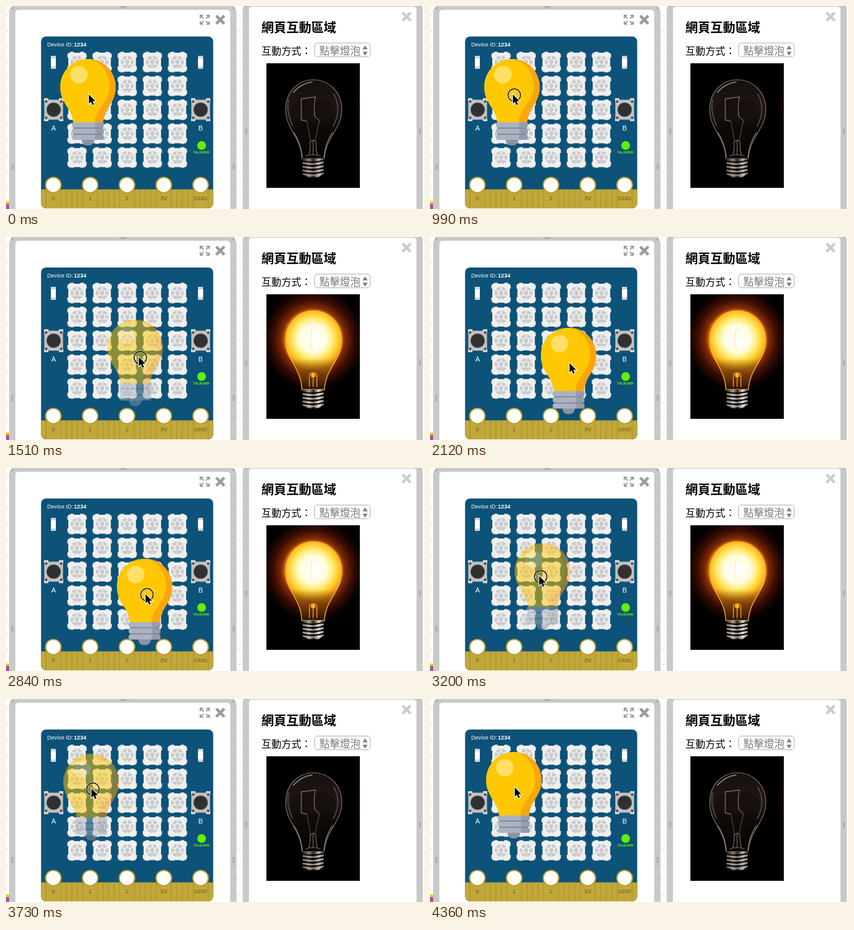
Write an HTML page with a canvas that moves like this. It is 671 px wide and 326 px high and loops after 5170 ms.

```html
<!DOCTYPE html>
<html lang="zh-Hant">
<head>
<meta charset="utf-8">
<title>Drag the bulb</title>
<style>
html, body { margin: 0; width: 100%; height: 100%; overflow: hidden; background: #fff; }
canvas { display: block; }
</style>
</head>
<body>
<canvas id="stage" width="671" height="326"></canvas>
<script>
const W = 671, H = 326, LOOP = 5170;
const SANS = '"Liberation Sans", Arial, sans-serif';
const CJK = '"Noto Sans CJK TC", "Noto Sans CJK", sans-serif';
const stage = document.getElementById('stage').getContext('2d');

function layer(w, h, draw) {
  const c = document.createElement('canvas');
  c.width = w;
  c.height = h;
  draw(c.getContext('2d'));
  return c;
}

function rect(g, x, y, w, h, color, r = 0) {
  g.fillStyle = color;
  g.beginPath();
  g.roundRect(x, y, w, h, r);
  g.fill();
}

function oval(g, x, y, rx, ry, color) {
  g.fillStyle = color;
  g.beginPath();
  g.ellipse(x, y, rx, ry, 0, 0, Math.PI * 2);
  g.fill();
}

const disc = (g, x, y, r, color) => oval(g, x, y, r, r, color);

function fill(g, d, color) {
  g.fillStyle = color;
  g.fill(new Path2D(d));
}

function line(g, d, color, width = 1) {
  g.strokeStyle = color;
  g.lineWidth = width;
  g.stroke(new Path2D(d));
}

function text(g, s, x, y, font, color, align = 'left') {
  g.font = font;
  g.fillStyle = color;
  g.textAlign = align;
  g.fillText(s, x, y);
}

function gradient(grad, stops) {
  stops.forEach(([at, color]) => grad.addColorStop(at, color));
  return grad;
}

// Calls draw for the four sign pairs
function corners(draw) {
  for (const sx of [-1, 1]) for (const sy of [-1, 1]) draw(sx, sy);
}

// ---- windows ----

function grip(g, x, y, cols, rows) {
  for (let i = 0; i < cols; i++)
    for (let j = 0; j < rows; j++) rect(g, x + i * 2, y + j * 2, 1, 1, '#777');
}

function cross(g, x, y, color) {
  line(g, `M${x - 6.5} ${y - 6.5}l13 13m0 -13l-13 13`, color, 4.4);
}

function expandIcon(g, x, y) {
  corners((sx, sy) => {
    const p = (a, b) => `${x + sx * a} ${y + sy * b}`;
    line(g, `M${p(2, 2)}L${p(7, 7)}M${p(7.2, 2.4)}L${p(7.2, 7.2)}L${p(2.4, 7.2)}`, '#999', 1.8);
  });
}

function windows(g) {
  rect(g, 0, 0, W, H, '#fff');
  for (let y = 15; y < H; y += 25) {
    rect(g, 1, y, 2, 1, '#ccc');
    rect(g, 374, y, 2, 1, '#ccc');
  }
  rect(g, 0, 314, 6, 4, '#f8c400');
  rect(g, 0, 318, 6, 8, '#9a5ba5');

  rect(g, 5, -4, 365, 400, '#c9c9c9', 15);
  rect(g, 15, 6, 345, 400, '#fff', 5);
  rect(g, 380, -9, 289, 400, '#c9c9c9', 15);
  rect(g, 390, 1, 269, 400, '#fff', 5);
  grip(g, 184, 0, 5, 2);
  for (const x of [9, 364]) {
    grip(g, x, 254, 2, 5);
    grip(g, x, 2, 2, 2);
  }
  for (const x of [384, 663]) {
    grip(g, x, 197, 2, 5);
    grip(g, x, 0, 2, 1);
  }

  expandIcon(g, 319, 22);
  cross(g, 344, 22, '#999');
  cross(g, 643, 17, '#ccc');

  text(g, '網頁互動區域', 410, 42, `bold 20px ${CJK}`, '#000');
  text(g, '互動方式：', 410, 78, `16px ${CJK}`, '#000');
  rect(g, 495, 59, 90, 23, '#b0b0b0', 5);
  rect(g, 496, 60, 88, 21, '#fff', 4);
  text(g, '點擊燈泡', 503, 78, `16.5px ${CJK}`, '#7a7a7a');
  fill(g, 'M572.5 69.5l4 -6l4 6zM572.5 73.5l4 6l4 -6z', '#777');
}

// ---- circuit board ----

function pixelLed(g, x, y) {
  corners((sx, sy) => {
    rect(g, x + sx * 12.5 - 3, y + sy * 10 - 3, 6, 6, '#e6e6e6');
    rect(g, x + sx * 8 - 3, y + sy * 13.5 - 3, 6, 6, '#e6e6e6');
  });
  rect(g, x - 14, y - 15, 28, 30.5, '#efefef');
  disc(g, x, y, 10.3, '#cbcbcb');
  for (let i = 0; i < 6; i++) {
    const a = i * Math.PI / 3 + Math.PI / 6;
    line(g, `M${x} ${y}l${11 * Math.cos(a)} ${11 * Math.sin(a)}`, '#efefef', 2);
  }
  disc(g, x, y, 5.4, '#efefef');
  disc(g, x, y - 0.5, 3.4, '#cbcbcb');
  rect(g, x - 1.5, y, 3, 8, '#cbcbcb');
}

function pushButton(g, x, label) {
  const y = 166.5;
  corners((sx, sy) => rect(g, x + sx * 12 - 3.5, y + sy * 16 - 2.5, 7, 5, '#d5d5d5'));
  rect(g, x - 15, y - 16, 30, 32, '#c3c3c3');
  corners((sx, sy) => disc(g, x + sx * 12, y + sy * 13, 2, '#4a4a4a'));
  disc(g, x, y, 12, '#8d8d8d');
  disc(g, x, y, 11, '#303030');
  text(g, label, x, 200, `11px ${SANS}`, '#fff', 'center');
}

function board(g) {
  g.save();
  g.beginPath();
  g.roundRect(56.3, 49, 276.3, 276, 8);
  g.clip();
  rect(g, 56, 48, 277, 278, '#0d5278');
  rect(g, 56, 294.5, 277, 32, '#c2a83a');
  const pins = ['0', '1', '2', '3V', 'GND'];
  for (let i = -1; i < 5; i++)
    for (let j = 0; j < 5; j++)
      line(g, `M${88 + i * 59.1 + j * 8.8} 294.5v32`, '#a58c2b');
  pins.forEach((name, i) => {
    const x = 76 + i * 59.1;
    disc(g, x, 287.6, 13.4, '#bb9f30');
    disc(g, x, 287.6, 11.3, '#fff');
    text(g, name, x, 312, `9.5px ${SANS}`, '#6c5a1c', 'center');
  });
  g.restore();

  text(g, 'Device ID:', 66, 65, `9.1px ${SANS}`, '#fff');
  text(g, '1234', 109, 65, `bold 9px ${SANS}`, '#fff');
  for (let i = 0; i < 5; i++)
    for (let j = 0; j < 5; j++) pixelLed(g, 114 + i * 40.3, 90 + j * 38.3);
  for (const x of [76, 312.3]) {
    rect(g, x - 4, 80, 8, 21, '#d4d4d4');
    rect(g, x - 4, 84, 8, 13, '#fff');
  }
  pushButton(g, 76.5, 'A');
  pushButton(g, 312.5, 'B');
  disc(g, 314, 224, 7, '#62f000');
  text(g, 'TALBORIK', 313.7, 236.5, `bold 5.2px ${SANS}`, '#62f000', 'center');
}

// ---- bulb photograph ----

const GLASS = 'M493.5 118.5C518 118.5 539 138 539 166C539 198 514 208 511 245H475C473 208 449 198 449 166C449 138 469 118.5 493.5 118.5Z';

function screwBase(g, dark, mid, bright) {
  const grad = gradient(g.createLinearGradient(476, 0, 511, 0),
    [[0, dark], [0.3, mid], [0.5, dark], [0.75, bright], [1, dark]]);
  fill(g, 'M476 245H510V268Q507 273 500 275H486Q479 273 476 268Z', grad);
  for (let y = 249; y < 273; y += 6) {
    line(g, `M476 ${y}q17 4 34 -1`, '#0c0908', 2.2);
    line(g, `M476 ${y + 3}q17 4 34 -1`, bright, 1.2);
  }
}

function photoOff(g) {
  rect(g, 418, 92, 150, 200, '#000');
  fill(g, GLASS, gradient(g.createLinearGradient(0, 118, 0, 245),
    [[0, '#15100e'], [0.35, '#1f1714'], [0.6, '#0e0a08'], [1, '#050403']]));
  oval(g, 493, 167, 35, 18, '#17100e');
  line(g, GLASS, '#7b716b', 1.2);
  line(g, 'M526 141Q540 166 525 193M454 150Q449 168 460 192', '#4d4440', 2);
  line(g, 'M461 139Q474 124 492 122', '#91867f', 1.6);
  line(g, 'M476 243Q473 219 462 203M510 243Q513 219 524 203', '#91867f', 1.2);
  line(g, 'M483 185L474 183V149L497 146Q493 160 496 178L503 184', '#968c85', 1);
  line(g, 'M483 185L489 217M503 184L496 217', '#5a514c', 1);
  line(g, 'M486 240Q489 229 488 219Q493 212 498 219Q497 229 500 240M493 216V240', '#7d736c', 1.1);
  line(g, 'M481 241Q493 236 505 241', '#5c524b', 1.5);
  screwBase(g, '#2a2320', '#8a8079', '#c4bbb3');
  oval(g, 568, 163, 6, 26, '#140303');
  rect(g, 568, 130, 8, 66, '#fff');
}

function photoOn(g) {
  rect(g, 418, 92, 150, 200, '#000');
  rect(g, 418, 92, 150, 200, gradient(g.createRadialGradient(493, 164, 0, 493, 164, 84),
    [[0, '#ffb020'], [0.53, '#e27a0c'], [0.6, '#822c05'], [0.75, '#3d0e03'], [0.9, '#120301'], [1, '#000']]));
  fill(g, GLASS, gradient(g.createRadialGradient(493, 163, 0, 493, 163, 52),
    [[0, '#fff'], [0.42, '#fffce0'], [0.6, '#ffee78'], [0.8, '#ffc526'], [1, '#d98810']]));
  fill(g, GLASS, gradient(g.createLinearGradient(0, 195, 0, 245),
    [[0, 'rgba(60,20,3,0)'], [0.5, 'rgba(80,30,4,.7)'], [1, 'rgba(28,10,4,.95)']]));
  line(g, GLASS, '#f4b535', 1.3);
  line(g, 'M492 146Q487 165 492 184', '#f7e6b5', 1);
  line(g, 'M487 241V221Q493 214 499 221V241M493 217V241', '#d88a1a', 1.6);
  disc(g, 493, 222, 3.5, '#ffb52a');
  screwBase(g, '#2a2522', '#aaa39b', '#e2ddd6');
}

// ---- dragged bulb and pointer ----

const bulb = layer(92, 142, g => {
  fill(g, 'M44.5 0C69 0 89 20 89 45C89 72 70 78 69 103H21C19 78 0 72 0 45C0 20 20 0 44.5 0Z', '#ffc803');
  fill(g, 'M50 .4C72 3 89 21 89 45C89 72 70 78 69 103H55C57 78 79 70 79 45C79 26 70 8 50 .4Z', '#f9a60e');
  disc(g, 30, 25.5, 14, '#ffe066');
  fill(g, 'M34 129H55Q54 139 44.5 139Q35 139 34 129Z', '#8b93a4');
  rect(g, 21, 108, 47, 18, '#838b9b');
  for (const y of [102, 112, 122]) {
    rect(g, 19, y, 51, 8, '#abb3c2', 3);
    rect(g, 56, y, 14, 8, '#959dac', 3);
  }
});

function pointer(g, x, y, pressed) {
  if (pressed) {
    for (const [color, width] of [['rgba(255,255,255,.7)', 3], ['#111', 1.5]]) {
      g.strokeStyle = color;
      g.lineWidth = width;
      g.beginPath();
      g.arc(x + 2.3, y + 1, 10, 0, Math.PI * 2);
      g.stroke();
    }
  }
  const arrow = `M${x} ${y}v14.8l3.4 -3.1l2.4 5.4l2.5 -1.1l-2.3 -5.3h4.6z`;
  line(g, arrow, '#fff', 2);
  fill(g, arrow, '#000');
}

// ---- motion ----

// Runs of picture changes: first, last, count
const RUNS = [[0, 0, 1], [990, 1510, 7], [1600, 1950, 5], [2120, 2120, 1],
  [2840, 3290, 6], [3380, 3820, 6], [4270, 4360, 2]];

function held(t) {
  const [a, b, n] = RUNS.filter(r => r[0] <= t).pop();
  const step = (b - a) / (n - 1) || 1;
  return a + Math.min(n - 1, Math.floor((t - a) / step + 0.01)) * step;
}

function ease(t, a, b, power) {
  const u = Math.min(1, Math.max(0, (t - a) / (b - a)));
  return 1 - Math.pow(1 - Math.pow(u, 1.5), power);
}

// The hand moves sideways a little ahead of its vertical travel
function handAt(t) {
  const out = power => ease(t, 990, 1950, power);
  const back = power => ease(t, 2840, 3820, power);
  return [133 + 91 * out(4.2) - 88 * back(3.2), 142 + 60.5 * out(3.6) - 60.5 * back(2.6)];
}

const between = (t, a, b) => t >= a && t < b;

const scene = photo => layer(W, H, g => { windows(g); board(g); photo(g); });
const dark = scene(photoOff), lit = scene(photoOn);

function render(now) {
  const t = held(now % LOOP);
  const dragged = between(t, 1000, 2115) || between(t, 2850, 4355);
  const pressed = between(t, 990, 2115) || between(t, 2840, 4265);
  const [x, y] = handAt(t);
  const [bx, by] = handAt(t - 45);
  stage.drawImage(between(t, 1330, 3375) ? lit : dark, 0, 0);
  stage.globalAlpha = dragged ? 0.5 : 1;
  stage.drawImage(bulb, bx - 46, by - 57);
  stage.globalAlpha = 1;
  pointer(stage, x, y, pressed);
}

let start;
function tick(now) {
  start ??= now;
  render(Math.max(0, now - start));
  requestAnimationFrame(tick);
}
render(0);
requestAnimationFrame(tick);
</script>
</body>
</html>
```
